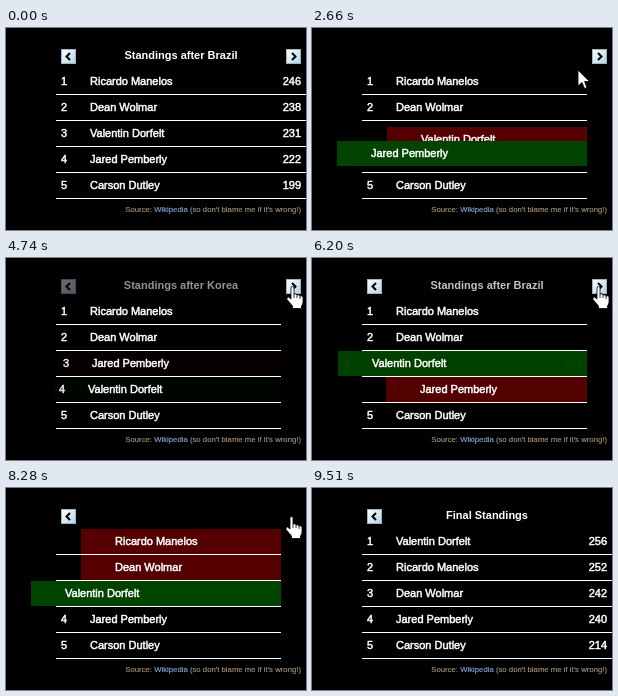
An HTML page that plays this animation: 300 px wide and 202 px high, repeating every 9.97 s.

```html
<!DOCTYPE html>
<html lang="en">
<head>
<meta charset="utf-8">
<title>Standings</title>
<style>
  html, body { margin: 0; width: 100%; height: 100%; overflow: hidden; background: #000; }
  #stage {
    position: relative; width: 300px; height: 202px; overflow: hidden;
    background: #000; color: #fff;
    font: 11px/25px Arial, "Liberation Sans", sans-serif; white-space: nowrap;
  }
  #stage div, #stage span, #stage svg { position: absolute; }
  #title { left: 75px; top: 15px; width: 200px; text-align: center; font-weight: bold; }
  .btn { top: 21px; width: 15px; height: 15px; }
  .btn rect { fill: url(#sky); stroke: #9db4c2; }
  .btn path { fill: none; stroke: #000; stroke-width: 2; }
  #prev { left: 55px; }
  #next { left: 280px; }
  #table { left: 25px; top: 41px; width: 275px; height: 130px; overflow: hidden; }
  .line { left: 25px; right: 0; height: 1px; background: #fff; }
  .row { left: 25px; width: 250px; height: 25px; -webkit-text-stroke: .5px #fff; }
  .rank { left: 5px; }
  .name { left: 34px; }
  .score { right: 5px; }
  #source { right: 5px; top: 169px; font-size: 7.75px; color: #a3907c; -webkit-text-stroke: .15px; }
  #source b { font-weight: normal; color: #84a4d2; }
  #cursor { left: 0; top: 0; overflow: visible; }
</style>
</head>
<body>
<div id="stage">
  <div id="title"></div>
  <svg id="prev" class="btn" viewBox="0 0 15 15">
    <defs>
      <linearGradient id="sky" x2="1" y2="1">
        <stop offset="0" stop-color="#fff"/><stop offset="1" stop-color="#b4d4e4"/>
      </linearGradient>
    </defs>
    <rect x=".5" y=".5" width="14" height="14"/>
    <path d="M9 4L5.5 7.5L9 11"/>
  </svg>
  <svg id="next" class="btn" viewBox="0 0 15 15">
    <rect x=".5" y=".5" width="14" height="14"/>
    <path d="M6 4L9.5 7.5L6 11"/>
  </svg>
  <div id="table"></div>
  <div id="source">Source: <b>Wikipedia</b> (so don't blame me if it's wrong!)</div>
  <svg id="cursor" width="18" height="24" fill="#fff" stroke="#000" stroke-width=".8">
    <path id="arrow" d="M0 0V16L4 12.5L6.5 18.5L9 17.5L6.5 11.5H11.5Z"/>
    <g id="hand">
      <path d="M5 13V2Q5 .5 6.5 .5T8 2V8Q11 7 11 9Q14 8 14 10Q17 9 17 11.5V16Q17 18 15.5 20V22.5H6.5V20L1 13.5Q.5 11 2.5 11Z"/>
      <path d="M8 8v4M11 9v3M14 10v3" fill="none"/>
    </g>
  </svg>
</div>
<script>
const LOOP = 9970, TICK = 1000 / 13, FIRST = 346;
const SLIDE = 600, SWAP = 560, FADE = 400, SHIFT = 25, ROW = 26;

const drivers = ['Ricardo Manelos', 'Dean Wolmar', 'Valentin Dorfelt', 'Jared Pemberly', 'Carson Dutley'];

const korea = { title: 'Standings after Korea', order: [0, 1, 3, 2, 4], scores: [231, 220, 210, 206, 189], prev: 0, next: 1 };
const brazil = { title: 'Standings after Brazil', order: [0, 1, 2, 3, 4], scores: [246, 238, 231, 222, 199], prev: 1, next: 1 };
const final = { title: 'Final Standings', order: [2, 0, 1, 3, 4], scores: [256, 252, 242, 240, 214], prev: 1, next: 0 };

// fade: title leaves; out: rows slide apart; swap: rows change place; back: rows return
const moves = [
  { from: brazil, to: korea, fade: 1420, out: 1577, swap: 2480, back: 3050 },
  { from: korea, to: brazil, fade: 4550, out: 4627, swap: 5560, back: 6125 },
  { from: brazil, to: final, fade: 7250, out: 7320, swap: 8300, back: 8880 }
];

// time, x, y of the pointer tip
const path = [
  [340, 134, 99], [900, 68, 26], [1200, 63, 28], [1280, 62, 28], [1430, 62, 28],
  [1810, 162, 38], [2400, 262, 46], [3350, 278, 30], [3700, 287, 28], [4300, 287, 28],
  [4350, 286, 28], [7050, 286, 28], [7120, 285, 28], [8300, 285, 28], [9000, 280, 204]
];

const $ = id => document.getElementById(id);
const swing = p => 0.5 - Math.cos(Math.PI * Math.min(1, Math.max(0, p))) / 2;
const mix = (a, b, p) => a + (b - a) * p;

function add(parent, tag, cls, text = '') {
  const el = document.createElement(tag);
  el.className = cls;
  el.textContent = text;
  return parent.appendChild(el);
}

for (let i = 0; i < 5; i++) add($('table'), 'div', 'line').style.top = i * ROW + 25 + 'px';

const rows = drivers.map(name => {
  const el = add($('table'), 'div', 'row');
  const rank = add(el, 'span', 'rank');
  add(el, 'span', 'name', name);
  return { el, rank, score: add(el, 'span', 'score') };
});

function drawRow(row, d, m, t) {
  const a = m.from.order.indexOf(d), b = m.to.order.indexOf(d);
  const dir = Math.sign(b - a);
  const away = dir ? swing((t - m.out) / SLIDE) - swing((t - m.back) / SLIDE) : 0;
  const x = Math.round(dir * SHIFT * away);
  const y = Math.round(ROW * mix(a, b, swing((t - m.swap) / SWAP)));
  const done = t >= m.back, place = done ? b : a;
  row.el.style.transform = `translate(${x}px, ${y}px)`;
  row.el.style.zIndex = dir < 0 ? 2 : dir;
  row.el.style.background = dir < 0 ? `rgba(0,68,0,${away})` : `rgba(85,0,0,${away})`;
  row.rank.textContent = place + 1;
  row.score.textContent = (done ? m.to : m.from).scores[place];
  row.rank.style.opacity = row.score.style.opacity = 1 - away;
}

function drawCursor(t) {
  const i = path.findIndex(p => p[0] > t);
  $('cursor').style.display = i > 0 ? '' : 'none';
  if (i < 1) return;
  const [t0, x0, y0] = path[i - 1], [t1, x1, y1] = path[i];
  const p = (t - t0) / (t1 - t0);
  const x = Math.round(mix(x0, x1, p)), y = Math.round(mix(y0, y1, p));
  const over = y >= 21 && y < 36 && ((x >= 55 && x < 70) || (x >= 280 && x < 295));
  $('cursor').style.transform = `translate(${over ? x - 6 : x}px, ${y}px)`;
  $('arrow').style.display = over ? 'none' : '';
  $('hand').style.display = over ? '' : 'none';
}

function draw(t) {
  const m = moves.filter(v => t >= v.fade).pop() || moves[0];
  const gone = swing((t - m.fade) / FADE);
  const retitle = m.back - 205, fresh = t >= retitle;
  $('title').textContent = (fresh ? m.to : m.from).title;
  $('title').style.opacity = fresh ? swing((t - retitle) / FADE) : 1 - gone;
  for (const b of ['prev', 'next']) $(b).style.opacity = mix(m.from[b], m.to[b], gone);
  const moving = t >= m.out && t < m.back + SLIDE;
  $('table').style.width = (moving ? 250 : 275) + 'px';
  rows.forEach((row, d) => drawRow(row, d, m, t));
  drawCursor(t);
}

const start = performance.now();
function frame() {
  const t = (performance.now() - start) % LOOP;
  draw(t < FIRST ? 0 : FIRST + Math.floor((t - FIRST) / TICK) * TICK);
  requestAnimationFrame(frame);
}
frame();
</script>
</body>
</html>
```
